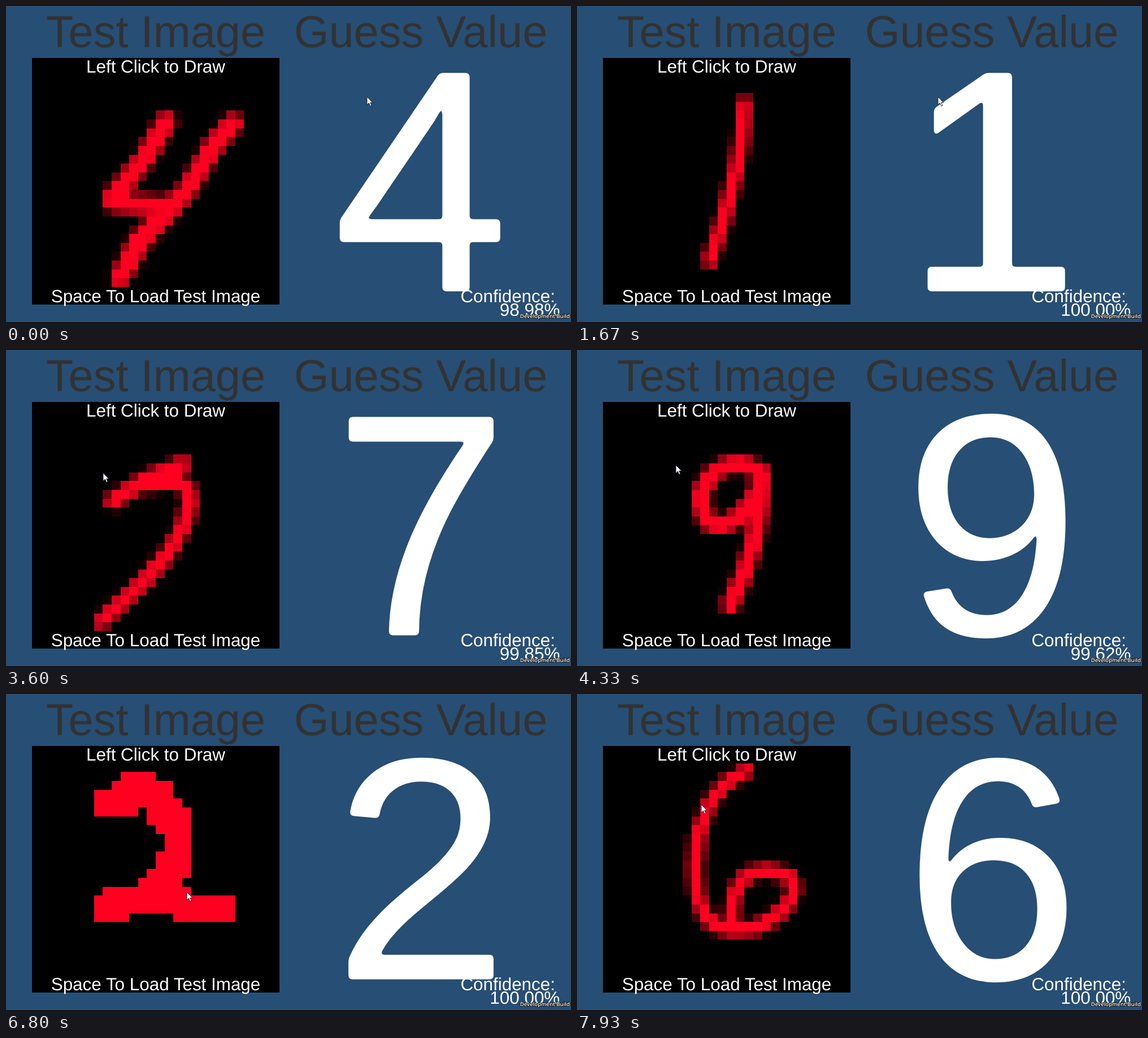
Write an HTML page with a canvas that moves like this. It is 1000 px wide and 560 px high and loops after 8 s.

```html
<!DOCTYPE html>
<html lang="en">
<head>
<meta charset="utf-8">
<title>Digit guesser</title>
<style>
  html, body { margin: 0; width: 100%; height: 100%; overflow: hidden; background: #274e74; }
  canvas, svg { position: absolute; left: 0; top: 0; width: 1000px; height: 560px; }
  text {
    font-family: "Liberation Sans", Arial, sans-serif; font-kerning: normal;
    text-rendering: geometricPrecision; fill: #fff;
  }
  .title { font-size: 79.4px; fill: #323232; }
  .label { font-size: 31.4px; }
  .mid { text-anchor: middle; }
  .end { text-anchor: end; }
  #guess { font-size: 560px; }
  #badge {
    font: 600 9.6px "Open Sans", "Noto Sans", sans-serif;
    stroke: #111; stroke-width: 2px; stroke-linejoin: round; paint-order: stroke;
  }
</style>
</head>
<body>
<canvas id="board" width="1000" height="560"></canvas>
<svg viewBox="0 0 1000 560">
  <defs>
    <filter id="soften" filterUnits="userSpaceOnUse" x="540" y="90" width="400" height="450">
      <feGaussianBlur stdDeviation="3"/>
      <feComponentTransfer><feFuncA type="linear" slope="8" intercept="-2.65"/></feComponentTransfer>
    </filter>
  </defs>
  <text class="title mid" x="265" y="72.6">Test Image</text>
  <text class="title mid" x="734" y="72.6">Guess Value</text>
  <g filter="url(#soften)"><text id="guess" class="mid" x="734.5" y="504.8">4</text></g>
  <text class="label mid" x="265" y="118">Left Click to Draw</text>
  <text class="label mid" x="265" y="525">Space To Load Test Image</text>
  <text class="label" x="804.4" y="525">Confidence:</text>
  <text id="confidence" class="label end" x="980.3" y="549">98.98%</text>
  <text id="badge" class="end" x="998" y="553">Development Build</text>
  <path id="cursor" d="M0 0V14L3.4 11L5.8 16.4L8 15.4L5.7 10.2H9.8Z" fill="#fff" stroke="#15202b" stroke-width=".9"/>
</svg>
<script>
const GRID = 28, LEFT = 46.3, TOP = 91.6, SIDE = 437.6, CELL = SIDE / GRID;
const STEPS = 120, STEPS_PER_MS = 0.015;
const DRAW_START = 74, DRAW_END = 102, CLEARED = 104, CURSOR_LEAD = 0.8;

const $ = id => document.getElementById(id);
const board = $("board").getContext("2d");
const cells = Object.assign(document.createElement("canvas"), { width: GRID, height: GRID });
const pen = cells.getContext("2d");
pen.lineCap = pen.lineJoin = "round";
board.imageSmoothingEnabled = false;

// Handwriting per digit: pen width and path in cell units; "b" marks a second hand
const hands = {
  "0": [2.2, "M15.5 6.5C22 8 18 21 13 21S8 7 15.5 6.5"],
  "1": [1.7, "M16 5Q16 12 12.1 23"],
  "1b": [1.9, "M15.7 5.2Q15 14 12.2 24"],
  "3": [2.2, "M8 7C14 4 19 9 12.5 13C21 13 17 22 4.5 20.5"],
  "4": [2.3, "M15.2 7.3Q13.5 11 9.2 15.8V16.4L15 16.8M22.8 7.4C18.5 11.5 19 14 16.2 16.5Q11.5 20.5 10 24.8"],
  "6": [1.7, "M16.3 2.8C11 5 10.4 11 10.4 14S11 21 14.8 21S21.7 18 21.7 16S18 13.9 16.6 14.6Q14.3 16 14.6 20.6"],
  "7": [3, "M8.5 12.6C8.5 9.5 9 9 10.5 9.1L18 8.8Q19.6 8.7 19.3 10.5C18.8 13.5 13.2 22 12.6 25.7"],
  "7b": [1.9, "M9.1 11.2Q12.5 8.6 17 7.1M13 9.2Q17.9 8.2 17.9 11.3C17.8 15 12.5 21 7.9 24.9"],
  "8": [2, "M18 6C10 5 11 10 14 13.5S16.5 22 13.5 21.5S10.5 17 15 12.5S19 8 18 6"],
  "9": [2, "M18 8C13 5 10 10 11.5 13S18 12 18 8Q18 16 14.4 23"]
};

// [step, digit, confidence]
const scenes = [
  [0, "4", 98.98], [13, "0"], [19, "8"], [25, "1"], [30, "1b"], [34, "7"], [43, "0"], [48, "1"],
  [54, "7b", 99.85], [59, "1b", 99.97], [63, "9", 99.62],
  [74, "7", 91.46], [77, "3", 99.93], [82, "2"], [104, "3"], [115, "9", 99.41], [119, "6"]
];

const cursorKeys = [
  [33, 639, 161], [36, 558, 231], [41, 558, 231], [54, 172, 218],
  [73, 178, 193], [102, 320, 351], [119, 220, 196]
];

// The mouse stroke, and its drawn length over time
const brush = document.createElementNS("http://www.w3.org/2000/svg", "path");
brush.setAttribute("d", "M8.5 6.5H10.5L11.5 4.5L12.5 4.7L14.1 5.95L16.3 8.8V13.6L13.1 17.4" +
  "L9.5 17.7L8.5 18.4L10.2 17.7H16.8L17.3 18.4H21.5");
const brushKeys = [[DRAW_START, 0], [78, 19.8], [86, 25.2], [98, brush.getTotalLength()]];

function keyed(keys, step) {
  const next = keys.findIndex(k => k[0] > step);
  if (next < 0) return keys[keys.length - 1].slice(1);
  const a = keys[Math.max(0, next - 1)], b = keys[next];
  const f = next ? (step - a[0]) / (b[0] - a[0]) : 0;
  return a.map((v, i) => v + (b[i] - v) * f).slice(1);
}

function drawHand([width, path]) {
  pen.lineWidth = width;
  pen.stroke(new Path2D(path));
}

function drawBrush(length) {
  for (let s = 0; s <= length; s += 0.15) {
    const { x, y } = brush.getPointAtLength(s);
    pen.fillRect(Math.floor(x) - 1, Math.floor(y) - 1, 3, 3);
  }
}

function render(step) {
  const [, digit, confidence = 100] = scenes.filter(s => s[0] <= step).pop();
  let [x, y] = keyed(cursorKeys, step);

  pen.fillStyle = "#000";
  pen.fillRect(0, 0, GRID, GRID);
  pen.fillStyle = pen.strokeStyle = "#ff0020";
  if (step < DRAW_START || step >= CLEARED) {
    drawHand(hands[digit]);
  } else {
    const [length] = keyed(brushKeys, step);
    drawBrush(length);
    if (step < DRAW_END) {
      const tip = brush.getPointAtLength(length + CURSOR_LEAD);
      x = LEFT + tip.x * CELL;
      y = TOP + tip.y * CELL;
    }
  }
  board.clearRect(0, 0, 1000, 560);
  board.drawImage(cells, LEFT, TOP, SIDE, SIDE);

  $("cursor").setAttribute("transform", `translate(${Math.round(x)} ${Math.round(y)})`);
  $("guess").textContent = digit[0];
  $("confidence").textContent = confidence.toFixed(2) + "%";
}

const start = performance.now();
let shown = -1;
function tick() {
  const time = (performance.now() - start) % (STEPS / STEPS_PER_MS);
  const step = Math.floor(time * STEPS_PER_MS + 0.06) % STEPS;
  if (step !== shown) render(shown = step);
  requestAnimationFrame(tick);
}
tick();
</script>
</body>
</html>
```
